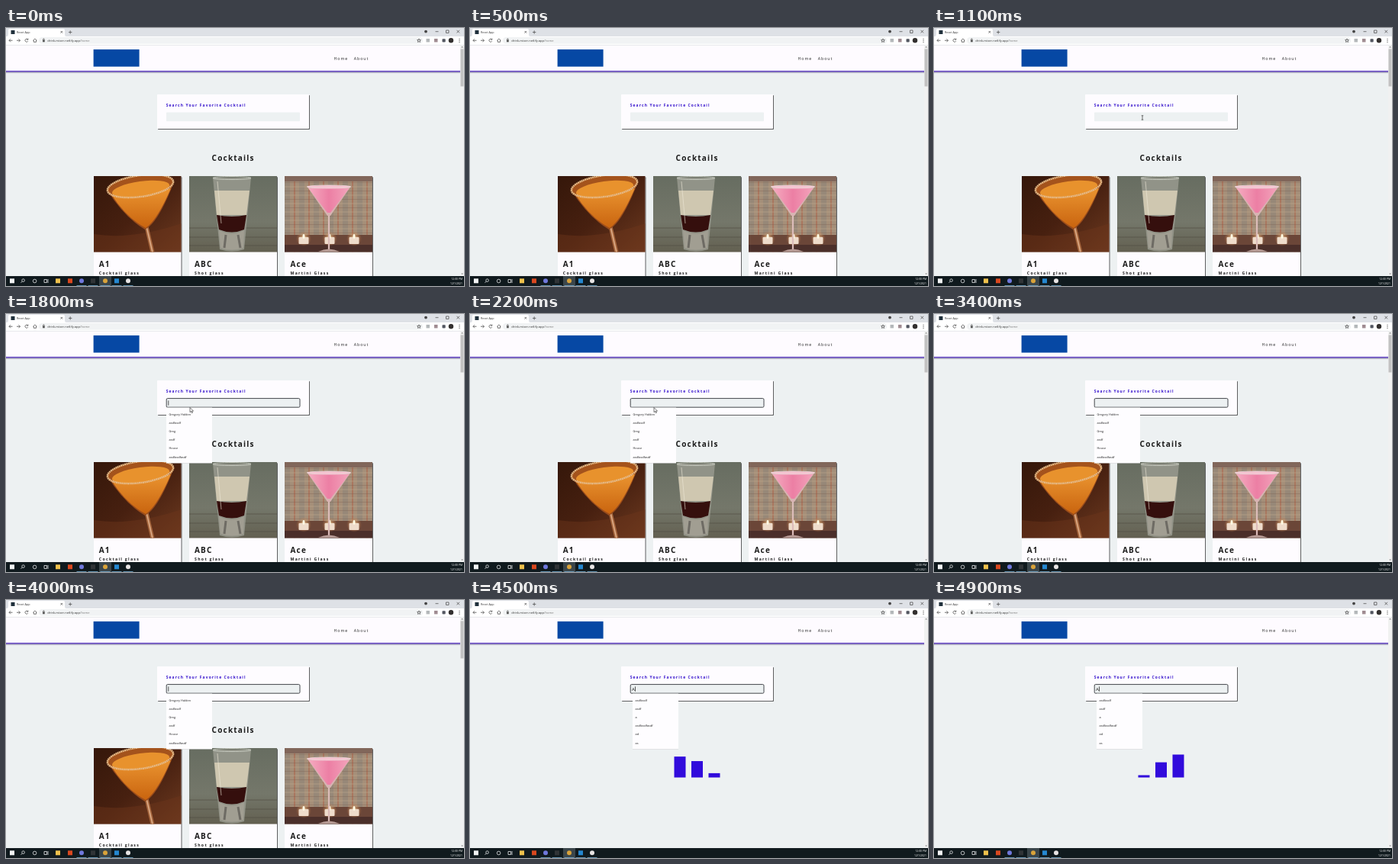
An HTML page for the animation above (5 s loop, 600 by 338 pixels).

```html
<!DOCTYPE html>
<html lang="en">
<head>
<meta charset="utf-8">
<title>Cocktail search</title>
<style>
  html, body { margin: 0; width: 100%; height: 100%; overflow: hidden; background: #edf1f2; }
  svg { display: block; }
  text { font-family: "Open Sans", "Noto Sans", sans-serif; fill: #1c1c1c; white-space: pre; }
  .ui { font-size: 3.75px; fill: #333; }
  .url { font-size: 4.05px; fill: #333; }
  .nav { font-size: 5.2px; letter-spacing: .95px; fill: #222; }
  .label { font-size: 5px; font-weight: 700; letter-spacing: 1.1px; fill: #3410cc; }
  .title { font-size: 10px; font-weight: 700; letter-spacing: 1.2px; }
  .sub { font-size: 5.2px; font-weight: 700; letter-spacing: 1.3px; }
  .item { font-size: 3.9px; fill: #222; }
  .clock { font-size: 3.4px; fill: #fff; text-anchor: end; }
  .card { fill: #fefcff; filter: drop-shadow(1.3px 1.3px .6px rgba(0, 0, 0, .6)); }
  .menu rect { fill: #fefdff; filter: drop-shadow(0 .6px .7px rgba(0, 0, 0, .35)); }
  .line { fill: none; stroke: #555; stroke-width: .8; }
</style>
</head>
<body>
<svg id="stage" width="100%" height="100%" viewBox="0 0 600 338">
  <defs>
    <linearGradient id="brown" x2="1" y2="1">
      <stop stop-color="#35170a"/><stop offset=".5" stop-color="#472010"/><stop offset="1" stop-color="#6d3a20"/>
    </linearGradient>
    <linearGradient id="orange" x2="0" y2="1">
      <stop stop-color="#ea9430"/><stop offset="1" stop-color="#c9640f"/>
    </linearGradient>
    <linearGradient id="moss" x2="0" y2="1">
      <stop stop-color="#676d61"/><stop offset=".6" stop-color="#74776a"/><stop offset="1" stop-color="#625f50"/>
    </linearGradient>
    <linearGradient id="pink">
      <stop stop-color="#f5abc0"/><stop offset=".5" stop-color="#ec7fa4"/><stop offset="1" stop-color="#f3a3bb"/>
    </linearGradient>
    <radialGradient id="glow">
      <stop stop-color="#ffe2a8"/><stop offset="1" stop-color="#c77a46" stop-opacity="0"/>
    </radialGradient>
    <pattern id="plaid" width="19" height="11" patternUnits="userSpaceOnUse">
      <rect width="19" height="11" fill="#a58f79"/>
      <rect width="7" height="11" fill="#978878"/>
      <rect x="12" width="2" height="11" fill="#a9775f"/>
      <rect y="2" width="19" height="2" fill="#bfa88b" opacity=".3"/>
      <rect y="8" width="19" height="1" fill="#7b5b4c" opacity=".35"/>
    </pattern>
  </defs>

  <rect width="600" height="338" fill="#edf1f2"/>

  <!-- browser -->
  <rect width="600" height="11" fill="#dee1e6"/>
  <path d="M1 11Q3 11 3 8.500V3Q3 1 5 1H75Q77 1 77 3V8.500Q77 11 79 11Z" fill="#fff"/>
  <rect x="6.500" y="3" width="5" height="5" fill="#20303c"/>
  <text class="ui" x="14" y="6.900">React App</text>
  <path class="line" d="M71.500 4l2.600 2.600m0-2.600l-2.600 2.600M82 5.500h4.400m-2.200-2.200v4.400M562.500 4.700h4M576.500 3h3.500v3.500h-3.500zM590.500 2.800l3.600 3.600m0-3.600l-3.600 3.600"/>
  <circle cx="550" cy="4.600" r="1.900" fill="#444"/>
  <rect y="11" width="600" height="11.500" fill="#fff"/>
  <rect x="43" y="12" width="503" height="8.800" rx="4.400" fill="#f1f3f4"/>
  <path class="line" d="M8.500 16.300H4m2-2l-2 2 2 2M14 16.300h4.500m-2-2l2 2-2 2M28.600 15a2 2 0 1 0 .2 2.200M28.900 13.700v1.600h-1.600M35.500 16.300l2.400-2.200 2.400 2.200M36.300 16v2.400h3.200V16"/>
  <rect x="48" y="15.800" width="2.800" height="2.500" fill="#555"/>
  <path class="line" d="M48.600 16v-1.200a.8.8 0 0 1 1.600 0V16"/>
  <text class="url" x="54.300" y="17.700">drink-mixer.netlify.app<tspan fill="#777">/home</tspan></text>
  <path class="line" d="M541 14l.7 1.600 1.700.1-1.300 1.100.4 1.700-1.500-.9-1.500.9.400-1.700-1.300-1.100 1.700-.1z"/>
  <rect x="550.500" y="14" width="4.500" height="4.500" fill="#b4b8ba"/>
  <rect x="561" y="14" width="4.500" height="4.500" fill="#a08c92"/>
  <rect x="571.500" y="14.300" width="4.200" height="4.200" rx=".8" fill="#525660"/>
  <circle cx="583" cy="16.200" r="3.200" fill="#33302f"/>
  <path d="M594 14v5" stroke="#444" stroke-width="1" stroke-dasharray="1"/>

  <!-- page header -->
  <rect y="22.500" width="595" height="33.700" fill="#fefbff"/>
  <rect y="22" width="600" height=".6" fill="#dcdfe3"/>
  <rect y="56" width="595" height="1.500" fill="#5a38c2"/>
  <rect y="57.500" width="595" height="1.200" fill="#8f89ad"/>
  <rect x="114.600" y="28.100" width="60" height="22.500" fill="#0648a4"/>
  <text class="nav" x="429.600" y="42">Home</text>
  <text class="nav" x="455.800" y="42">About</text>
  <rect x="595" y="22.600" width="5" height="302.400" fill="#f1f1f1"/>
  <path d="M596.300 25.600l1.300-1.500 1.300 1.500zM596.300 321.500l1.300 1.500 1.300-1.500z" fill="#777"/>

  <!-- search -->
  <rect class="card" x="198" y="87" width="199" height="45" rx=".8"/>
  <text class="label" x="209.700" y="102.600">Search Your Favorite Cocktail</text>
  <rect x="210" y="110.500" width="175" height="11.700" rx="1" fill="#edf1f2"/>
  <rect id="ring" x="210.200" y="110.600" width="174.800" height="11.600" rx="1.500" fill="none" stroke="#303338" stroke-width=".9"/>
  <text id="typed" x="212" y="118.600" font-size="6">A</text>
  <rect id="caret" y="113.400" width=".7" height="6.300" fill="#111"/>

  <!-- results -->
  <g id="results">
    <rect x="595.500" y="27.500" width="4" height="49" fill="#c1c1c1"/>
    <text class="title" x="269.600" y="173.500">Cocktails</text>
    <rect class="card" x="115" y="194" width="114.500" height="140" rx="1.200"/>
    <rect class="card" x="240" y="194" width="115" height="140" rx="1.200"/>
    <rect class="card" x="365" y="194" width="115" height="140" rx="1.200"/>

    <svg x="115" y="194" width="114.500" height="99.500">
      <rect width="115" height="100" fill="url(#brown)"/>
      <path d="M0 76Q50 84 115 62V100H0z" fill="#6d371c" opacity=".45"/>
      <path d="M69 66L77 100" stroke="#a8683f" stroke-width="5"/>
      <path d="M69 66L77 100" stroke="#e4b592" stroke-width="1.300"/>
      <path d="M18 19Q40 54 67 70 84 62 105 8Z" fill="#9a4c1b"/>
      <path d="M23 24Q43 55 68 68 83 58 101 16 65 27 23 24Z" fill="url(#orange)"/>
      <g transform="rotate(-8 61 13)">
        <ellipse cx="61" cy="13" rx="43.500" ry="14" fill="#a4531c"/>
        <ellipse cx="61" cy="17" rx="38" ry="10" fill="#e8922d"/>
        <ellipse cx="61" cy="13" rx="43.500" ry="14" fill="none" stroke="#e6b985" stroke-width="2.500" stroke-dasharray="2 .5"/>
      </g>
    </svg>

    <svg x="240" y="194" width="115" height="99.500">
      <rect width="115" height="100" fill="url(#moss)"/>
      <path d="M0 68H115M0 80H115M0 91H115" stroke="#514f43" stroke-width="1.500" opacity=".45"/>
      <path d="M31 2H81L72 96Q56 101 40 96Z" fill="#9b9d91" opacity=".8"/>
      <path d="M33 19H79L75 51H36Z" fill="#cfc7b0"/>
      <path d="M36 51Q56 55 75 51L72 70Q56 77 39 70Z" fill="#350f0d"/>
      <path d="M39 71Q56 80 72 71L71 94Q56 99 41 94Z" fill="#a19e92"/>
      <path d="M48 77L46 94M64 77L67 94" stroke="#6e6b64" stroke-width="3"/>
      <ellipse cx="56" cy="2.500" rx="25" ry="2" fill="none" stroke="#c8cbc1" stroke-width="1"/>
      <path d="M37 7L42 62" stroke="#eee8d8" stroke-width="1" opacity=".6"/>
    </svg>

    <svg x="365" y="194" width="115" height="99.500">
      <rect width="115" height="100" fill="url(#plaid)"/>
      <rect width="115" height="7" fill="#81665a"/>
      <rect y="77" width="115" height="13" fill="#6b4638"/>
      <rect y="90" width="115" height="10" fill="#4b2f2a"/>
      <g id="candles"></g>
      <path d="M58 50V96" stroke="#dcbcb9" stroke-width="2.200"/>
      <path d="M44 99Q58 92 72 99Z" fill="#b69a94"/>
      <path d="M29 13H87L60 52H56Z" fill="#d8b3b2"/>
      <path d="M31.500 16H84.500L60 48H56Z" fill="url(#pink)"/>
      <ellipse cx="58" cy="14" rx="28.500" ry="2" fill="#f4c3d0" stroke="#f0dce0" stroke-width=".7"/>
    </svg>

    <text class="title" x="121.700" y="312.500">A1</text>
    <text class="title" x="247" y="312.500">ABC</text>
    <text class="title" x="372.500" y="312.500">Ace</text>
    <text class="sub" x="121.800" y="322.900">Cocktail glass</text>
    <text class="sub" x="247" y="322.900">Shot glass</text>
    <text class="sub" x="372.500" y="322.900">Martini Glass</text>
  </g>

  <g id="loader" fill="#310bdc"></g>
  <g id="history" class="menu"></g>
  <g id="matches" class="menu"></g>

  <!-- taskbar -->
  <rect y="325" width="600" height="13" fill="#101a1e"/>
  <rect x="122" y="325" width="16" height="13" fill="#3b464b"/>
  <g id="apps"></g>
  <g fill="none" stroke="#e8eaeb" stroke-width=".8">
    <circle cx="22.600" cy="330.600" r="1.800"/><path d="M21.300 332l-1.800 1.800"/>
    <circle cx="37.600" cy="331.500" r="2.300"/>
    <path d="M50 329.500h3.500v4H50zM55 329v5"/>
  </g>
  <text class="clock" x="598" y="330.300">12:00 PM</text>
  <text class="clock" x="598" y="336">12/1/2021</text>

  <path id="arrow" d="M0 0V6.200L1.500 4.900 2.500 7.200 3.500 6.700 2.500 4.600H4.500Z" fill="#fff" stroke="#222" stroke-width=".6"/>
  <path id="beam" d="M-1.300-2.700H1.300M0-2.700V2.700M-1.300 2.700H1.300" fill="none" stroke="#333" stroke-width=".7"/>
</svg>
<script>
const LOOP = 5000, CLICK = 1650, HIDE = 2400, TYPE = 4500;
const $ = id => document.getElementById(id);

function add(parent, tag, attrs, text) {
  const el = document.createElementNS("http://www.w3.org/2000/svg", tag);
  for (const key in attrs) el.setAttribute(key, attrs[key]);
  if (text) el.textContent = text;
  return parent.appendChild(el);
}

function fillMenu(menu, x, items) {
  add(menu, "rect", { x, y: 122.5, width: 60, height: 73 });
  items.forEach((s, i) => add(menu, "text", { class: "item", x: x + 3.5, y: 132.5 + i * 11.22 }, s));
}
fillMenu($("history"), 210, ["Gregory Halden", "asdfasdf", "Greg", "asdf", "House", "asdfasdfasdf"]);
fillMenu($("matches"), 213, ["asdfasdf", "asdf", "a", "asdfasdfasdf", "ad", "as"]);

for (const x of [25, 59, 91]) {
  add($("candles"), "circle", { cx: x, cy: 82, r: 10, fill: "url(#glow)" });
  add($("candles"), "rect", { x: x - 6.5, y: 80, width: 13, height: 9, rx: 1, fill: "#efdccb" });
  add($("candles"), "ellipse", { cx: x, cy: 79, rx: 1.5, ry: 3, fill: "#fffbe5" });
}

// x, colour, round, open
const apps = [[8, "#f2f4f5"], [68, "#efc14c"], [84, "#d9481f"], [99, "#6f78dc", 1, 1], [114, "#303437", 0, 1],
  [130, "#d9a33a", 1, 1], [145, "#2587d0", 0, 1], [160, "#e7e4e4", 1, 1]];
for (const [x, fill, round, open] of apps) {
  add($("apps"), "rect", { x: x - 3, y: 328.3, width: 6, height: 6, rx: round ? 3 : 0, fill });
  if (open) add($("apps"), "rect", { x: x - 6.5, y: 337.2, width: 13, height: .8, fill: "#77aed2" });
}

const bars = [267.5, 290, 312.5].map(x => add($("loader"), "rect", { x, width: 15 }));
const lags = [0, 1.83, Math.PI];

// time, x, y
const path = [[600, 330, 340], [1000, 273, 117.5], [1300, 273, 117.5], [1600, 246, 117.5],
  [1700, 246, 117.5], [1800, 241, 122.5]];

function pointAt(t) {
  const i = path.findIndex(p => p[0] > t);
  if (i < 0) return path[path.length - 1].slice(1);
  if (!i) return path[0].slice(1);
  const [t0, x0, y0] = path[i - 1], [t1, x1, y1] = path[i];
  const k = (t - t0) / (t1 - t0), e = k * k * (3 - 2 * k);
  return [x0 + (x1 - x0) * e, y0 + (y1 - y0) * e];
}

function show(id, on) { $(id).style.display = on ? "" : "none"; }

function draw(t) {
  const focused = t >= CLICK, typed = t >= TYPE;
  show("ring", focused);
  show("typed", typed);
  show("results", !typed);
  show("loader", typed);
  show("history", focused && !typed);
  show("matches", typed);
  show("caret", focused && (t - (typed ? TYPE : CLICK)) % 1000 < 500);
  $("caret").setAttribute("x", typed ? 216.2 : 212.5);

  bars.forEach((bar, i) => {
    const h = 16.5 + 13.5 * Math.cos((t - 4900) / 1000 * 2 * Math.PI + Math.PI - lags[i]);
    bar.setAttribute("y", 232.5 - h);
    bar.setAttribute("height", h);
  });

  const [x, y] = pointAt(t), seen = t >= 600 && t < HIDE;
  const inField = x > 210 && x < 385 && y > 110 && y < 122;
  show("beam", seen && inField);
  show("arrow", seen && !inField);
  for (const id of ["beam", "arrow"]) $(id).setAttribute("transform", `translate(${x} ${y})`);
}

function tick() {
  draw(performance.now() % LOOP);
  requestAnimationFrame(tick);
}
tick();
</script>
</body>
</html>
```
